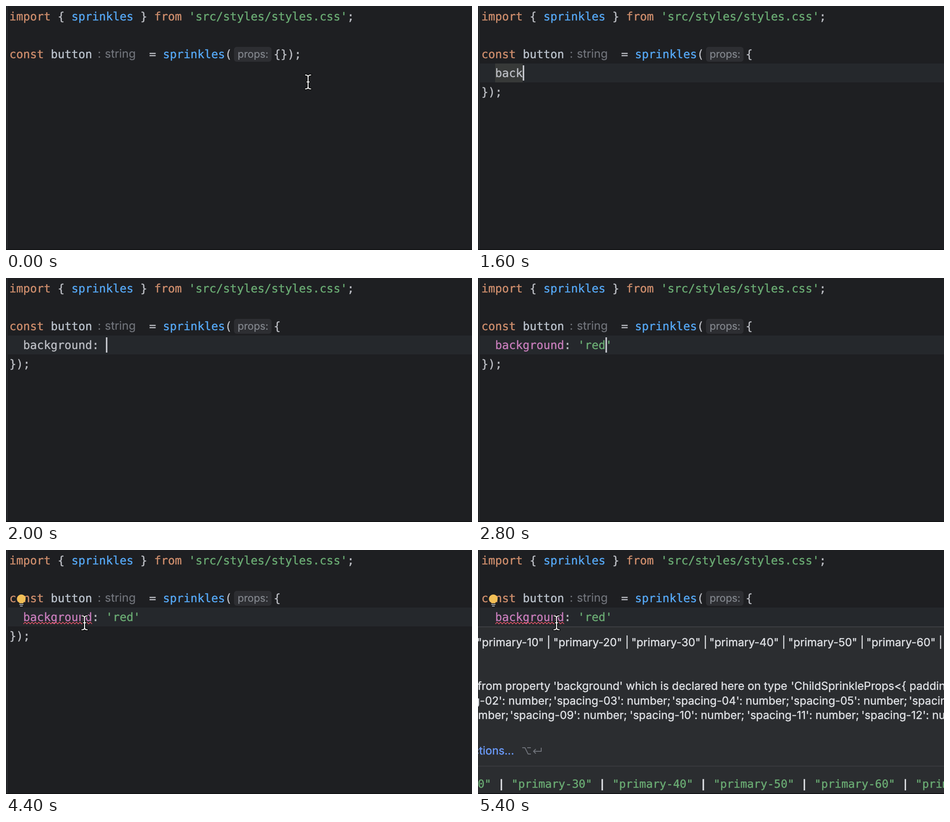
An HTML page that plays this animation: 1032 px wide and 543 px high, repeating every 5600 ms.

```html
<!DOCTYPE html>
<html lang="en">
<head>
<meta charset="utf-8">
<title>Editor completion</title>
<style>
  html, body { margin: 0; width: 100%; height: 100%; overflow: hidden; background: #1e1f22; }
  svg { display: block; width: 100%; height: 100%; }
  text {
    white-space: pre; text-rendering: geometricPrecision;
    fill: currentColor; stroke: currentColor; stroke-width: .45;
  }
  .mono { font: 25.363px "DejaVu Sans Mono", monospace; color: #bcbec4; }
  .list { font-size: 24.57px; }
  .doc { font-size: 24.77px; }
  .ui { font: 24.6px Inter, sans-serif; color: #dfe1e5; }
  .hint { font-size: 25.4px; color: #71747b; stroke-width: .2; }
  .pill { font-size: 22.7px; color: #868a91; stroke-width: .2; }
  .tip { font-size: 23px; color: #6f737a; stroke-width: .2; }
  .key { color: #cf8e6d; }
  .fn { color: #56a8f5; }
  .str { color: #6aab73; }
  .prop { color: #c77dbb; }
  .name { color: #bcc4ce; }
  .link { color: #6b9bfa; }
  .match { color: #548af7; }
  .dim { color: #6f737a; }
  .bar { color: #dfe1e5; font-weight: bold; }
  .icon { font-size: 20px; color: #b589ec; }
  .line { fill: none; stroke: #6f737a; stroke-width: 2; stroke-linejoin: round; }
  .wave { fill: none; stroke: #e8566a; stroke-width: 1.5; }
</style>
</head>
<body>
<svg viewBox="0 0 1032 543" preserveAspectRatio="none">
  <defs>
    <linearGradient id="shade" x1="0" y1="0" x2="0" y2="1">
      <stop offset="0" stop-color="#000" stop-opacity=".3"/>
      <stop offset="1" stop-color="#000" stop-opacity="0"/>
    </linearGradient>
    <path id="beam" d="M-6-15.5Q0-15.5 0-11Q0-15.5 6-15.5M0-11V11M-6 15.5Q0 15.5 0 11Q0 15.5 6 15.5M-2.5 0H2.5"/>
    <path id="enter" d="M19 0V8H2M7 3L2 8L7 13"/>
  </defs>

  <rect width="1032" height="543" fill="#1e1f22"/>
  <rect id="row" x="4" width="1028" height="42" fill="#25282c"/>
  <rect x="2" width="1.5" height="541" fill="#313438"/>
  <rect y="541" width="1032" height="2" fill="#121315"/>
  <rect id="word" x="38" y="128" height="42" fill="#373938"/>

  <g class="mono">
    <text x="7.5" y="32.2"><tspan class="key">import</tspan> { <tspan class="fn">sprinkles</tspan> } <tspan class="key">from</tspan> <tspan class="str">'src/styles/styles.css'</tspan>;</text>
    <text x="7.5" y="116.2"><tspan class="key">const</tspan> <tspan class="name">button</tspan></text>
    <text x="317" y="116.2">= <tspan class="fn">sprinkles</tspan>(</text>
    <text id="open" x="593" y="116.2"></text>
    <text id="typed" x="38" y="158.2"></text>
    <text id="close" x="7.5" y="200.2">});</text>
  </g>
  <g class="ui">
    <text class="hint" x="203" y="115">:</text>
    <text class="hint" x="219" y="115">string</text>
    <rect x="505" y="91" width="83" height="33" rx="6" fill="#2d2e32"/>
    <text class="pill" x="513" y="115">props:</text>
  </g>

  <g id="parseError"></g>
  <g id="typeError"></g>
  <rect id="caret" width="3.2" height="34" fill="#ced0d6"/>
  <g id="bulb">
    <path d="M34 99a9.6 9.6 0 0 1 4.6 18V118.5H29.4V117a9.6 9.6 0 0 1 4.6-18z" fill="#f2bf56"/>
    <path d="M29.5 121.3H38.5M31 124.8H37" stroke="#ced0d6" stroke-width="1.6"/>
  </g>

  <g id="popup">
    <rect y="275" width="1032" height="16" fill="url(#shade)"/>
    <rect y="170" width="1032" height="105" fill="#2b2d30"/>
    <rect y="178" width="1032" height="46" fill="#43454a"/>
    <rect y="224" width="1032" height="50" fill="#393b40"/>
    <path d="M0 171H1032M0 274.5H1032" stroke="#4b4d52" stroke-width="1.6"/>
    <circle cx="26.8" cy="201" r="12.3" fill="#2f2936" stroke="#a571e6" stroke-width="2"/>
    <text class="ui icon" x="26.8" y="207" text-anchor="middle">p</text>
    <text class="mono list" x="49.5" y="209.5"><tspan id="hit" class="match"></tspan><tspan id="rest"></tspan></text>
    <text class="mono list" x="217" y="209.5"><tspan class="dim">(properties, styles.css.ts)</tspan></text>
    <g class="ui">
      <text class="tip" x="10.5" y="258">Press</text>
      <use href="#enter" class="line" x="80" y="242.5"/>
      <text class="tip" x="106.5" y="258">to insert,</text>
      <path class="line" d="M210 250H226M221 245L226 250L221 255M230 244V256"/>
      <text class="tip" x="238" y="258">to replace</text>
      <text class="tip link" x="358.5" y="258">Next Tip</text>
    </g>
  </g>

  <g id="tooltip">
    <rect y="170" width="1032" height="371" fill="#2b2d30"/>
    <path d="M0 171H1032" stroke="#43454a" stroke-width="1.6"/>
    <g id="notes" class="ui"></g>
    <text class="ui link" x="80" y="455" text-anchor="end">More actions...</text>
    <path class="line" d="M98 440H104L111 454H117M109 440H117"/>
    <use href="#enter" class="line" x="121" y="440"/>
    <g id="docs">
      <path d="M0 481H1032" stroke="#3c3e43" stroke-width="1.6"/>
    </g>
    <rect y="541" width="1032" height="2" fill="#121315"/>
  </g>

  <g id="mouse" fill="none" stroke-linecap="round" stroke-linejoin="round">
    <use href="#beam" stroke="#000" stroke-width="5"/>
    <use href="#beam" stroke="#fff" stroke-width="2.2"/>
  </g>
</svg>
<script>
const LOOP = 5600, TICK = 100, COL = 15.27, LEFT = 7.5;
const $ = id => document.getElementById(id);

function add(parent, tag, attrs, text = '') {
  const el = document.createElementNS('http://www.w3.org/2000/svg', tag);
  for (const k in attrs) el.setAttribute(k, attrs[k]);
  el.textContent = text;
  return $(parent).appendChild(el);
}

function wave(parent, x, y, width) {
  let d = `M${x} ${y + 4}`;
  for (let i = 1; i * 3.8 <= width; i++) d += `L${x + i * 3.8} ${y + (i % 2 ? 0 : 4)}`;
  add(parent, 'path', { d, class: 'wave' });
}
wave('parseError', 207, 161, 15.3);
wave('parseError', 8, 203, 15.3);
wave('typeError', 38.5, 160.5, 152.5);

// Tooltip text
const note = (x, y, text, anchor = 'start') => add('notes', 'text', { x, y, 'text-anchor': anchor }, text);
const two = n => String(n).padStart(2, '0');
for (let i = 0; i < 6; i++) note(160.5 + 173.6 * i, 214, `"primary-${i + 1}0" |`, 'end');
note(1034, 214, '"primary-70"');
note(-1, 311, 'from property');
note(167, 311, "'background' which is declared here on type");
note(693, 311, "'ChildSprinkleProps<{ padding");
for (let i = 0; i < 5; i++) note(-95 + 262.3 * i, 343.5, `'spacing-${two(i + 2)}': number;`);
[68, 330, 590, 844].forEach((x, i) => note(x, 376, `'spacing-${two(i + 8)}': number;`, 'end'));
note(849, 376, "'spacing-12': number;");
for (let i = 0; i < 6; i++) {
  const x = 74 + 223.7 * (i - 1);
  const line = add('docs', 'text', { x, y: 529, class: 'mono doc' });
  line.innerHTML = `<tspan class="str">"primary-${i + 2}0"</tspan> <tspan class="bar">|</tspan>`;
}

const typing = [
  [0, ''], [800, 'b'], [900, 'ba'], [1000, 'bac'], [1200, 'back'], [1800, 'backg'],
  [2000, 'background: '], [2200, "background: ''"], [2400, "background: 'r'"],
  [2700, "background: 're'"], [2800, "background: 'red'"]
];
// Pointer moves: start, end, from x, y, to x, y
const moves = [[0, 400, 669, 169, 610, 112], [3900, 4400, 594, 116, 174, 162]];

const within = (t, a, b = LOOP) => t >= a && t < b;
const last = (table, t) => table.filter(r => r[0] <= t).pop();
const show = (id, on) => $(id).setAttribute('visibility', on ? 'visible' : 'hidden');
const put = (id, attrs) => { for (const k in attrs) $(id).setAttribute(k, attrs[k]); };

function pointer(t) {
  const [a, b, x0, y0, x1, y1] = last(moves, t);
  const p = Math.min(1, (t - a) / (b - a)), e = p * p * (3 - 2 * p);
  put('mouse', { transform: `translate(${x0 + (x1 - x0) * e} ${y0 + (y1 - y0) * e})` });
  show('mouse', within(t, 0, 600) || t >= 3900);
}

function draw(t) {
  const split = t >= 600, code = last(typing, t)[1];
  $('open').textContent = split ? '{' : '{});';
  show('close', split);
  put('row', { y: split ? 128 : 86 });
  show('row', t >= 500);

  const [, name, colon, value] = code.match(/^(\w*)(:? ?)(.*)$/);
  const tone = t >= 2500 ? 'prop' : '';
  $('typed').innerHTML = `<tspan class="${tone}">${name}</tspan>${colon}<tspan class="str">${value}</tspan>`;

  put('word', { width: name.length * COL });
  show('word', within(t, 1500, 2000));
  const col = 2 + code.length - (value ? 1 : 0);
  put('caret', split ? { x: LEFT + col * COL, y: 132 } : { x: 607.5, y: 90 });
  show('caret', within(t, 500, 3300) || within(t, 3600, 4100));

  $('hit').textContent = name;
  $('rest').textContent = 'background'.slice(name.length);
  show('popup', within(t, 1700, 2000));

  show('parseError', within(t, 2900, 4100));
  show('typeError', t >= 4100);
  show('bulb', t >= 4300);
  put('tooltip', { opacity: Math.max(0, Math.min(1, (t - 4500) / 300)) });
  put('docs', { opacity: t >= 5000 ? 1 : 0 });
  pointer(t);
}

let shown = -1;
function frame() {
  const t = Math.floor(performance.now() % LOOP / TICK) * TICK;
  if (t !== shown) draw(shown = t);
  requestAnimationFrame(frame);
}
frame();
</script>
</body>
</html>
```
